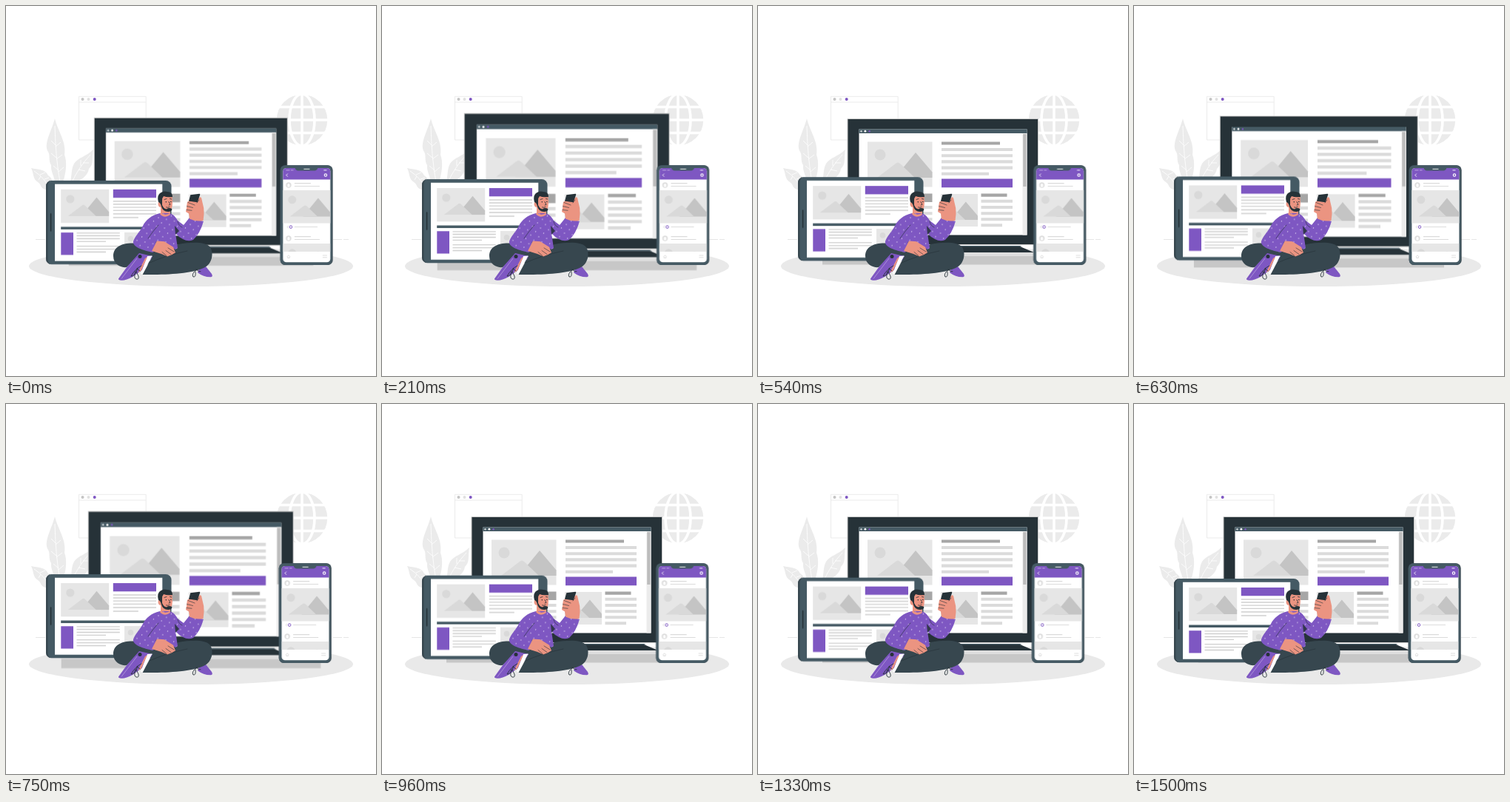
An HTML page that plays this animation: 500 px wide and 500 px high, repeating every 1540 ms.

```html
<!DOCTYPE html>
<html lang="en">
<head>
<meta charset="utf-8">
<title>Responsive devices</title>
<style>
  html, body { margin: 0; width: 100%; height: 100%; overflow: hidden; background: #fff; }
  svg.stage { display: block; width: 100vw; height: 100vh; }

  .monitor, .tablet, .phone { animation: 1540ms linear infinite; }
  .monitor { animation-name: heartbeat; transform-origin: 250px 248.8px; }
  .tablet { animation-name: float; }
  .phone { animation-name: shake; }

  @keyframes heartbeat {
    0% { transform: scale(1.013); }
    8.8%, 46.2% { transform: scale(1.1); }
    28.6%, 37.9%, 56.7%, 100% { transform: scale(1); }
  }
  @keyframes float {
    0% { transform: translateY(-.17px); }
    46.2% { transform: translateY(-6.3px); }
    97.7%, 100% { transform: none; }
  }
  @keyframes shake {
    0% { transform: translateX(-.13px); }
    8.8%, 87.4% { transform: translateX(-1px); }
    18.7%, 77.1% { transform: translateX(2px); }
    28.6%, 46%, 67.1% { transform: translateX(-4px); }
    37.9%, 56.7% { transform: translateX(4px); }
    97.7%, 100% { transform: none; }
  }

  .line { fill: none; stroke: #dbdbdb; }
  .head { fill: none; stroke: #a6a6a6; }
  .ink { fill: none; stroke: #263238; stroke-linecap: round; stroke-linejoin: round; }
  .accent { fill: #7e57c2; }
  .slate { fill: #455a64; }
  .dark { fill: #263238; }
  .skin { fill: #eb9481; }
  .pale { fill: #ebebeb; }
  .rib { fill: none; stroke: #fff; stroke-width: .8; }
</style>
</head>
<body>
<svg class="stage" viewBox="0 0 500 500">
  <defs>
    <g id="pic">
      <path fill="#e6e6e6" d="M0 0h87.5v61H0z"/>
      <circle cx="17" cy="17.5" r="7.5" fill="#d9d9d9"/>
      <path fill="#c4c4c4" d="M37 48.500L65 14.500 87.500 41v7.500z"/>
      <path fill="#d9d9d9" d="M13 48.500L38 29.500Q41 26.500 44 29.500L64 48.500z"/>
    </g>
    <g id="user">
      <circle r="3.7" fill="#dedede"/>
      <path fill="#fff" d="M-1.500 -.5a1.500 1.500 0 0 1 3 0v3h-3z"/>
      <path class="line" d="M8 -2.300h22M8 1.500h34" stroke-width="1.200"/>
    </g>
    <pattern id="dots" width="11" height="12" patternUnits="userSpaceOnUse" patternTransform="rotate(12)">
      <g fill="#e6dcf5">
        <circle cx="2.500" cy="3" r=".65"/>
        <circle cx="8" cy="9" r=".65"/>
      </g>
    </pattern>
    <path id="sweater" d="M208 280C196 283 189 289 185 297 181 305 174 311 172 318 171 324 179 329 199 333L203 319 211 318 229 329 232 327 229 307Q233 312 239 315 246 319 253 316 262 308 267 291L248 286 240 296 232 290C228 283 225 281 220 280z"/>
  </defs>

  <rect width="500" height="500" fill="#fff"/>

  <!-- backdrop -->
  <ellipse class="pale" cx="250" cy="351.500" rx="219" ry="27.500" style="fill:#e9e9e9"/>
  <path class="line" d="M40 315.500h13M442 315.500h12M456 315.500h7" stroke-width=".7"/>
  <path fill="#fff" stroke="#e6e6e6" stroke-width=".8" d="M98.500 122.300h90.700v58.700h-90.700zM98.500 130h90.700"/>
  <circle cx="103.500" cy="126.100" r="2" fill="#c4c4c4"/>
  <circle cx="111.500" cy="126.100" r="2" fill="#e0e0e0"/>
  <circle class="accent" cx="119.700" cy="126.100" r="2"/>

  <g class="pale">
    <path d="M66 152C70 169 82 184 79 201 83 211 81 226 77 238L66 240C66 230 60 224 61 215 57 209 60 202 57 197 50 187 62 168 66 152z"/>
    <path d="M118 194C116 205 119 214 112 220 111 229 101 236 90 240L87 237C89 229 88 220 92 213 97 205 109 203 118 194z"/>
    <path d="M34 219C43 221 53 220 57 229 64 233 63 240 63 248H53C46 246 48 241 43 238 36 234 38 227 34 219z"/>
  </g>
  <path class="rib" d="M66 162Q67 206 73 238M67 188l-6-6m6 8l7-6M68 205l-7-6m7 8l8-6M71 222l-7-6m7 8l7-6M114 201Q99 217 89 238M104 212l8 0M98 221l9 2M101 216l0-8M38 223Q53 233 59 247M46 228l7-3M52 234l6-2M47 230l-3 5"/>

  <circle class="pale" cx="400" cy="154" r="34.300"/>
  <g fill="none" stroke="#fff" stroke-width="3.600">
    <path d="M400 119v70M365 154h70M368 136.500h64M368 171.500h64"/>
    <ellipse cx="400" cy="154" rx="17" ry="35"/>
  </g>

  <g class="monitor">
    <path fill="#dedede" d="M87 332h326v8H87z"/>
    <path fill="#c7c7c7" d="M87 338h326v11.500H87z"/>
    <path class="dark" d="M146 325h208l19 8H127z"/>
    <path class="slate" d="M146 324h208l3 1.300H143z"/>
    <path class="dark" stroke="#c7c7c7" stroke-width="1" d="M121 152.500h257.500v170H121z"/>
    <path fill="#fff" d="M136.500 166.500h227v143h-227z"/>
    <path class="slate" d="M136.500 166.500h227v5.500h-227z"/>
    <circle cx="139.500" cy="169.200" r="1.300" fill="#c9d0d3"/>
    <circle cx="144.900" cy="169.200" r="1.400" fill="#fff"/>
    <circle class="accent" cx="150.600" cy="169.200" r="1.200"/>
    <path fill="#ececec" d="M357.500 172h6v137.500h-6z"/>
    <path fill="#bdbdbd" d="M358.200 173h4.300v71h-4.300z"/>

    <use href="#pic" x="148" y="183.500"/>
    <path class="head" stroke-width="4.100" d="M248 185.500h79M301.500 255.600h35"/>
    <path class="line" stroke-width="4.100" d="M248 194h96M248 202.200h96M248 210.400h96M248 218.600h96M248 226.800h64M301.500 263.800h42.500M301.500 272h42.500M301.500 280.200h42.500M301.500 288.200h42.500M301.500 296.200h28.500"/>
    <path class="accent" d="M248 233.500h96v11.800h-96z"/>
    <path class="head" stroke-width="11.500" d="M148 259.300h87.500"/>
    <path class="line" stroke-width="4.100" d="M148 272h87.500M148 280.200h87.500M148 288.200h87.500"/>
    <svg x="247" y="254" width="50" height="44"><use href="#pic" transform="translate(-13) scale(.72)"/></svg>
  </g>

  <g class="tablet">
    <rect class="slate" x="54" y="236" width="169.500" height="113.300" rx="7.500"/>
    <path fill="#37474f" d="M61.500 236a7.500 7.500 0 0 0-7.500 7.500v98.300a7.500 7.500 0 0 0 7.500 7.500q-5-1-5-7.500v-98.300q0-6.500 5-7.500z"/>
    <path class="ink" d="M60.600 281v23" stroke-width="1.600"/>
    <path fill="#fff" d="M66 240.700h145.300v104H66z"/>
    <use href="#pic" transform="translate(74.200 248) scale(.743)"/>
    <path class="accent" d="M144.800 248h58.200v11.300h-58.200zM74.300 306.200h16.700v30.300h-16.700z"/>
    <path class="slate" d="M74.200 298.500h127v3.400h-127z"/>
    <path class="line" stroke-width="1.300" style="stroke:#cfcfcf" d="M144.800 264h58.200M144.800 268h58.200M144.800 272.200h58.200M144.800 276.400h58.200M144.800 281h58.200M144.800 286h34M95.500 306.800h58.300M95.500 310.500h58.300M95.500 314.500h58.300M95.500 318.300h39.500M95.500 324.600h58.300M95.500 328.600h58.300M95.500 332.500h39.500"/>
    <use href="#pic" transform="translate(160 306) scale(.5)"/>
  </g>

  <g class="phone">
    <rect x="370.700" y="215.300" width="71" height="134.700" rx="6.500" fill="#37474f"/>
    <rect class="slate" x="370.700" y="215.300" width="70" height="134.700" rx="6.500"/>
    <rect x="374.400" y="219" width="64" height="127.300" rx="4.500" fill="#fff"/>
    <path class="accent" d="M374.400 234.500v-11a4.500 4.500 0 0 1 4.500-4.500h55a4.500 4.500 0 0 1 4.500 4.500v11z"/>
    <path class="slate" d="M390.500 218.800h31q-1.300 3.800-4.300 3.800h-22.400q-3 0-4.300-3.800z"/>
    <path fill="none" stroke="#fff" stroke-width=".9" d="M402.500 220.300h8M429.500 221.900h4M380.800 226.600l-2 2 2 2"/>
    <path fill="none" stroke="#cbb8e8" stroke-width=".8" d="M378.500 221.900h5M385 221.900h3.500"/>
    <circle cx="432" cy="228.600" r="1.700" fill="none" stroke="#fff" stroke-width="1.100"/>
    <use href="#user" x="382" y="242"/>
    <use href="#pic" transform="translate(374.400 249) scale(.7314)"/>
    <path class="line" stroke-width="1" d="M390 298.600h31M381.700 296.800q-3 1.800 0 3.600"/>
    <circle cx="385" cy="298.600" r="1.800" fill="none" stroke="#7e57c2" stroke-width="1"/>
    <use href="#user" x="382" y="314"/>
    <svg x="374.400" y="321" width="64" height="11"><use href="#pic" transform="scale(.7314)"/></svg>
    <path class="line" stroke-width=".9" d="M380 338.700l2-2 2 2M380.700 338.500v2h2.600v-2M428 337h6M428 339.800h6"/>
  </g>

  <g class="man">
    <!-- shoes -->
    <path class="accent" d="M152 368.500L166 349 177 334 190 330 198 339 185 356 171 366Q162 371 156 370.700 151.500 370.500 152 368.500z"/>
    <path fill="none" stroke="#b79be0" stroke-width=".8" d="M156 368.500L177 341"/>
    <path class="accent" d="M261 355l9-3 8 10q2 4-1 4.200-10 .3-18-6z"/>
    <!-- legs -->
    <path fill="#37474f" d="M178 321C160 319 145 324 145 338 145 350 157 354 163 353L180 334 198 338 184.500 363C214 363.500 250 362 267 354 279 349 281 334 276 326 270 318 250 319 233 322L212 334 196 328z"/>
    <path fill="#fff" d="M191 338l6.500-.5L184.500 362.500l-2.500-1z"/>
    <path class="skin" d="M188 341l3-2-8.500 19-4 2z"/>
    <circle class="dark" cx="181" cy="338.500" r="2.500"/>
    <path class="ink" stroke-width=".9" d="M183 351q-8 4-14 14 5 1 9-11m-3 5q-3 9 1 10 4 1 3-4l-3-6m1-4l4 3M258 356q-8 6-5 10 4 1 3-7m1-3q4 4 6 3"/>
    <path class="ink" stroke-width=".6" d="M194 347Q216 337 245 331" style="stroke:#263238"/>

    <!-- neck and sweater -->
    <path class="skin" d="M209 270h13v11q-6 5-13 0z"/>
    <use href="#sweater" class="accent"/>
    <use href="#sweater" fill="url(#dots)"/>
    <path class="skin" d="M209 279q6 5 12 1l1 2q-8 6-14-1z"/>
    <path class="dark" d="M228 297l6 7-5 5z" opacity=".85"/>
    <path class="ink" stroke-width=".6" d="M206 296q-8 9-14 18M232 291q1 6 6 8M203 319l-2 13"/>

    <!-- resting hand -->
    <path class="skin" d="M204 317.500l10 .7 12 7.500 3 7.500-5 3-6 2.300-8-3.500-13-4z"/>
    <path class="ink" stroke-width=".6" d="M227 332l-8-5M223 335.500l-7-5M217 337.500l-6-5"/>

    <!-- head -->
    <path class="skin" d="M208 258l6-3 10-1q1.500 10 .5 17-1 6-7 7-6 0-8-6-4 0-4-5 1-4 3-3z"/>
    <path class="dark" d="M206 265q-2-7 1-11 5-5 11-3 7 0 7 7-7 1-12-1-2 2-2 6v6q2 5 6 5.500 3-2.500 6.500-.8l1 1q-1 3.300-5.500 3.300-7 0-9-7-1-5-4-6z"/>
    <path class="ink" stroke-width=".8" d="M214 261.500l3-1M221.500 260.500l2.200.5M220 264.500l2 4-2 .5M216.500 272q2.500 1 4.500-.5"/>
    <circle class="dark" cx="216.300" cy="264.800" r=".8"/>
    <circle class="dark" cx="222.800" cy="264.500" r=".8"/>

    <!-- raised hand with handset -->
    <path class="skin" d="M248 287.500l-1-7-4-2.500 1-5 1-8 4-3 9 1 3-4q2.500-2 3.200 1l3 13 .3 8-1 9q-10 2-18.500-2.500z"/>
    <path class="dark" d="M249.300 255.200l12-1.500q1.200 0 .9 1.200l-3.500 10.300-11.700-1.500z"/>
    <path class="skin" d="M245 265.500q5-3 11 1.500l1 4-8 7-5-1z"/>
    <path class="ink" stroke-width=".6" d="M246 265.500l9 3.500M244.500 270.500l8 2M244 275.500l7 .8M258 266l3-4"/>
  </g>
</svg>
</body>
</html>
```
